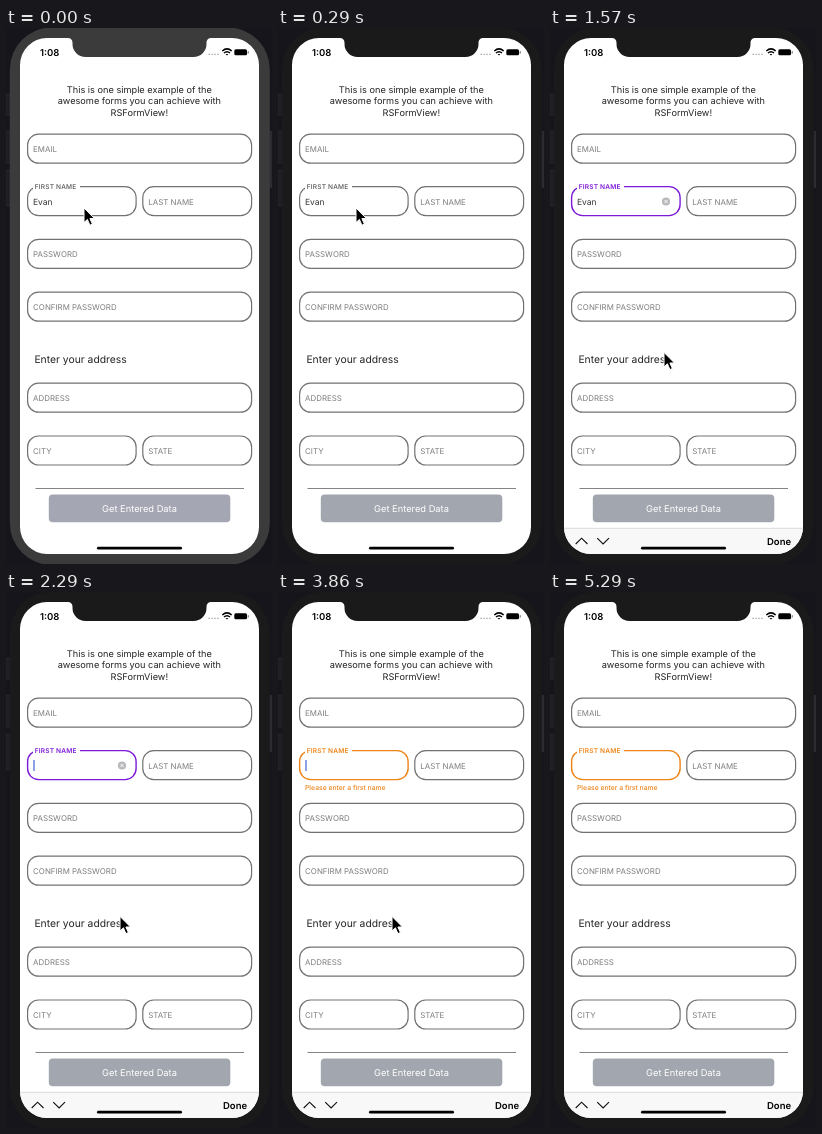
Write an HTML page that moves like this. It is 266 px wide and 536 px high and loops after 5710 ms.

```html
<!DOCTYPE html>
<html lang="en">
<head>
<meta charset="utf-8">
<title>Form demo</title>
<style>
  html, body { margin: 0; width: 100%; height: 100%; overflow: hidden; background: #15151b; }
  svg { display: block; width: 100%; height: 100%; }
  text { font-family: Inter, Roboto, sans-serif; fill: #242426; text-rendering: geometricPrecision; }
  .intro { font-size: 9.2px; text-anchor: middle; }
  .heading { font-size: 10.35px; }
  .button { font-size: 9.3px; text-anchor: middle; fill: #fff; }
  .hint { font-size: 7.9px; fill: #7c7c7c; }
  .value { font-size: 8.5px; fill: #333; }
  .label { font-size: 6.6px; letter-spacing: .025em; }
  .error { font-size: 6.8px; font-weight: 500; fill: #ec8418; }
  .strong { font-size: 9.5px; font-weight: 600; fill: #000; }
  .box { fill: none; stroke: #727272; stroke-width: 1.2; }
  .line { fill: none; stroke: #111; stroke-width: 1.15; }
</style>
</head>
<body>
<svg viewBox="0 0 266 536" preserveAspectRatio="none">
  <defs>
    <clipPath id="screenClip">
      <path id="screen" d="M14 37A27 27 0 0 1 41 10H62A4.500 4.500 0 0 1 66.500 14.500V16A13 13 0 0 0 79.500 29H187.500A13 13 0 0 0 200.500 16V14.500A4.500 4.500 0 0 1 205 10H226A27 27 0 0 1 253 37V499A27 27 0 0 1 226 526H41A27 27 0 0 1 14 499Z"/>
    </clipPath>
  </defs>

  <rect width="266" height="536" fill="#15151b"/>
  <path d="M0 66H4V87H0ZM0 103H4V135H0ZM0 142H4V178H0Z" fill="#1d1d23" stroke="#303036" stroke-width=".6"/>
  <path d="M263 103H266V160H263Z" fill="#2b2b31"/>
  <rect id="bezel" x="3.800" y="-.5" width="260" height="537.500" rx="42"/>
  <use href="#screen" fill="#fff"/>

  <g clip-path="url(#screenClip)">
    <text class="strong" x="34" y="27.500">1:08</text>
    <path d="M202.500 26.300H213" stroke="#aaa" stroke-width="1.300" stroke-dasharray="1.5 1.4"/>
    <g fill="none" stroke="#000" stroke-width="1.500">
      <path d="M216.300 23Q221 18.800 225.700 23M218 25Q221 22.400 224 25"/>
      <path d="M219.600 25.900H222.400L221 27.500Z" fill="#000" stroke="none"/>
    </g>
    <rect x="228.300" y="21.300" width="12.800" height="6" rx="1.600" fill="#000"/>
    <path d="M242.300 23.200V25.500" stroke="#777"/>

    <text class="intro" x="133.300" y="64.500">This is one simple example of the</text>
    <text class="intro" x="133.300" y="76.300">awesome forms you can achieve with</text>
    <text class="intro" x="133.300" y="88.100">RSFormView!</text>

    <g id="fields"></g>

    <rect id="nameBox" class="box" x="21.600" y="158.600" width="108.500" height="29" rx="11"/>
    <path d="M27 156H74V162H27Z" fill="#fff"/>
    <text id="nameLabel" class="label" x="28.800" y="161.200">FIRST NAME</text>
    <text id="nameText" class="value" x="27" y="177"></text>
    <rect id="caret" y="168" width="1.200" height="11" fill="#4169d6"/>
    <g id="clear">
      <circle cx="116" cy="173.500" r="4.100" fill="#b8b8bd"/>
      <path d="M114.400 171.900L117.600 175.100M117.600 171.900L114.400 175.100" stroke="#fff" stroke-width=".9"/>
    </g>
    <text id="error" class="error" x="27" y="198">Please enter a first name</text>

    <text class="heading" x="28.400" y="334.800">Enter your address</text>
    <path d="M29.500 460.500H238" stroke="#777" stroke-width=".9"/>
    <rect id="button" x="42.800" y="466.500" width="181.500" height="27.700" rx="4"/>
    <text class="button" x="133.500" y="484">Get Entered Data</text>

    <g id="toolbar">
      <rect x="14" y="500" width="240" height="40" fill="#f8f8f9"/>
      <path d="M14 500.300H254" stroke="#d2d2d5" stroke-width=".7"/>
      <path class="line" d="M25.700 516L31.600 510.200L37.500 516M47.200 510.200L53.100 516L59 510.200"/>
      <text class="strong" x="217" y="516.700">Done</text>
    </g>
    <rect x="91" y="518.800" width="85" height="2.800" rx="1.400" fill="#000"/>
  </g>

  <path id="cursor" d="M0 0V14.500L3.400 11.400L5.900 17.200L8.400 16.100L5.900 10.600H10.500Z" fill="#000" stroke="#fff" stroke-width="1" stroke-linejoin="round"/>
</svg>

<script>
const LOOP = 5710;
const $ = id => document.getElementById(id);
const GREY = '#727272', PURPLE = '#7d1ad8', ORANGE = '#ee8418';

const field = (label, x, y, w) =>
  `<rect class="box" x="${x}" y="${y}" width="${w}" height="29" rx="11"/>
   <text class="hint" x="${x + 5.5}" y="${y + 17.9}">${label}</text>`;

$('fields').innerHTML = [
  ['EMAIL', 21.6, 106.2, 224],
  ['LAST NAME', 136.8, 158.6, 108.8],
  ['PASSWORD', 21.6, 211.4, 224],
  ['CONFIRM PASSWORD', 21.6, 264.2, 224],
  ['ADDRESS', 21.6, 355.2, 224],
  ['CITY', 21.6, 408, 108.5],
  ['STATE', 136.8, 408, 108.8],
].map(args => field(...args)).join('');

// Each step lists only what changes at that time.
const steps = [
  [0, { bezel: '#3b3b3b', button: '#a5a6b3', color: GREY, name: 'Evan', caret: 0,
        clear: 0, error: 0, bar: 40, cursor: [78, 180] }],
  [140, { bezel: '#292929', button: '#a3a6b0' }],
  [290, { bezel: '#1a1a1a', button: '#a2a6ae' }],
  [570, { color: PURPLE, caret: 1, clear: 1, bar: 25, cursor: [84, 210] }],
  [710, { bar: 5, cursor: [114, 324.4] }],
  [860, { bar: 1.5 }],
  [1000, { bar: 0 }],
  [1140, { caret: .7 }],
  [1290, { caret: .25 }],
  [1430, { caret: 0 }],
  [1710, { caret: 1 }],
  [1860, { name: 'Eva' }],
  [2000, { name: 'Ev' }],
  [2290, { name: '' }],
  [2570, { color: '#b85070', clear: 0, error: .4 }],
  [2710, { color: ORANGE, error: 1 }],
  [3000, { caret: .75 }],
  [3140, { caret: .3 }],
  [3290, { caret: 0 }],
  [3710, { caret: .5 }],
  [3860, { caret: 1 }],
  [4000, { caret: .8 }],
  [4140, { caret: .3 }],
  [4290, { caret: 0 }],
  [4570, { cursor: [139, 344.3] }],
  [4710, { caret: .5 }],
  [4860, { caret: 1 }],
  [5000, { caret: .8 }],
  [5140, { caret: .3 }],
  [5290, { caret: 0, cursor: null }],
];

const stateAt = t => Object.assign({}, ...steps.filter(([at]) => at <= t).map(([, change]) => change));

function draw(t) {
  const s = stateAt(t);
  const idle = s.color === GREY;
  $('bezel').style.fill = s.bezel;
  $('button').style.fill = s.button;
  $('nameBox').style.stroke = s.color;
  $('nameBox').style.strokeWidth = idle ? 1.2 : 1.4;
  $('nameLabel').style.fill = idle ? '#555' : s.color;
  $('nameLabel').style.fontWeight = idle ? 500 : 600;
  $('nameText').textContent = s.name;
  $('caret').setAttribute('x', s.name ? 27 + $('nameText').getComputedTextLength() : 27.4);
  $('caret').style.opacity = s.caret;
  $('clear').style.opacity = s.clear;
  $('error').style.opacity = s.error;
  $('toolbar').setAttribute('transform', `translate(0 ${s.bar})`);
  $('cursor').style.display = s.cursor ? '' : 'none';
  if (s.cursor) $('cursor').setAttribute('transform', `translate(${s.cursor})`);
}

const start = performance.now();
function tick() {
  draw((performance.now() - start) % LOOP);
  requestAnimationFrame(tick);
}
tick();
</script>
</body>
</html>
```
